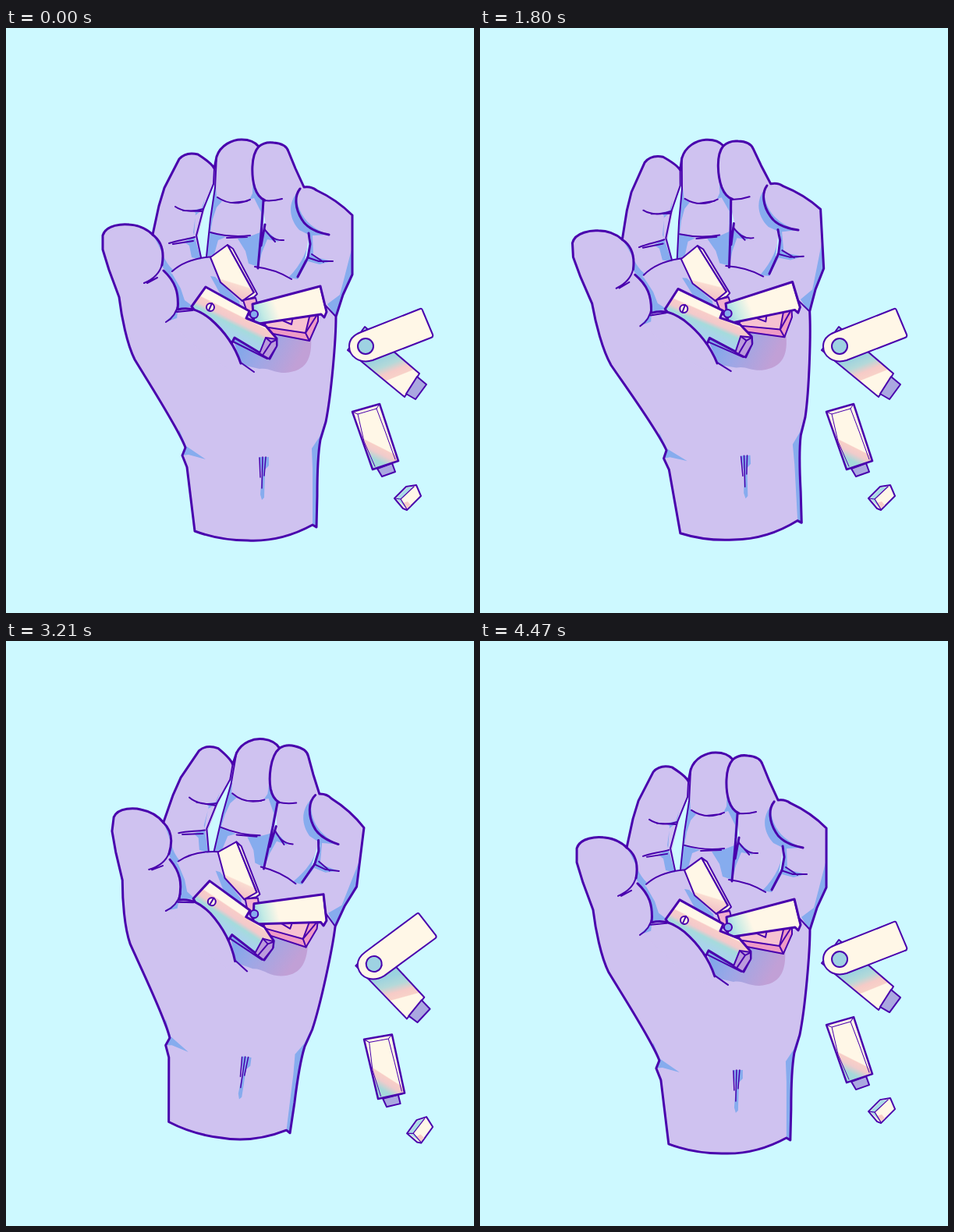
Write an HTML page that moves like this. It is 600 by 750 pixels and loops after 4500 ms.

```html
<!DOCTYPE html>
<html lang="en">
<head>
<meta charset="utf-8">
<title>Hand and drives</title>
<style>
  html, body { margin: 0; height: 100%; overflow: hidden; background: #cdf9ff; }
  svg { display: block; width: 100vw; height: 100vh; }
  path, circle, use { stroke-linejoin: round; stroke-linecap: round; }
  .ink { stroke: #4900ad; stroke-width: 2; }
  .bold { stroke: #4900ad; stroke-width: 3; }
  .line { fill: none; }
  .skin { fill: #cfc2f0; }
  .shade { fill: #86acee; }
  .sky { fill: #cdf9ff; }
  .cream { fill: #fff7e7; }
  .plug { fill: #aaa8e0; }
</style>
</head>
<body>
<svg viewBox="0 0 600 750">
  <defs>
    <linearGradient id="palm" gradientUnits="userSpaceOnUse" x1="305" y1="395" x2="372" y2="432">
      <stop stop-color="#80a8ea"/><stop offset=".4" stop-color="#9da7e6"/><stop offset="1" stop-color="#c1a0d6"/>
    </linearGradient>
    <linearGradient id="stripe" gradientUnits="userSpaceOnUse" x1="292" y1="349" x2="275" y2="383">
      <stop offset=".36" stop-color="#fff7e7"/><stop offset=".4" stop-color="#f8cdc8"/>
      <stop offset=".6" stop-color="#f3c9cb"/><stop offset=".76" stop-color="#a5dbdc"/><stop offset="1" stop-color="#a9d4ea"/>
    </linearGradient>
    <linearGradient id="upright" gradientUnits="userSpaceOnUse" x1="296" y1="319" x2="288" y2="345">
      <stop offset=".3" stop-color="#fff7e7"/><stop offset=".36" stop-color="#fadbd0"/><stop offset="1" stop-color="#f1bfc8"/>
    </linearGradient>
    <linearGradient id="side" gradientUnits="userSpaceOnUse" x1="314" y1="370" x2="347" y2="358">
      <stop stop-color="#92cfe4"/><stop offset=".45" stop-color="#c4ebe5"/><stop offset="1" stop-color="#fff7e7"/>
    </linearGradient>
    <linearGradient id="swivel" gradientUnits="userSpaceOnUse" x1="476" y1="420" x2="491" y2="457">
      <stop offset=".1" stop-color="#9bd3df"/><stop offset=".4" stop-color="#b4d9d9"/>
      <stop offset=".65" stop-color="#f6cbc7"/><stop offset=".84" stop-color="#f8d1c8"/><stop offset=".87" stop-color="#fff7e7"/>
    </linearGradient>
    <linearGradient id="stick" gradientUnits="userSpaceOnUse" x1="483" y1="530" x2="469" y2="558">
      <stop offset=".24" stop-color="#fff7e7"/><stop offset=".28" stop-color="#f8cfc7"/>
      <stop offset=".5" stop-color="#f0cbcb"/><stop offset=".8" stop-color="#a5d9da"/>
    </linearGradient>
    <path id="silhouette" d="M124 284V266C128 252 150 251 158 252C172 253 181 258 188 265L196 228L203 205L222 168C229 160 238 160 246 162C257 169 264 174 267 180L270 165C275 150 290 143 302 143C312 143 320 147 324 152C330 147 336 146 343 147C355 148 360 152 362 158L371 180L382 204C388 203 393 204 398 208Q424 220 444 240V316L432 342L423 370C423 400 417 470 410 505L403 528C400 545 399 565 399 600L398 640L393 637C360 655 330 658 310 657C280 657 258 651 242 645L232 563L226 548L230 538C222 515 180 450 165 425C155 405 148 370 145 345L132 310Z"/>
    <clipPath id="inside"><use href="#silhouette"/></clipPath>
  </defs>

  <g id="hand">
    <use href="#silhouette" class="skin"/>

    <g class="shade" clip-path="url(#inside)">
      <path d="M186 262L192 272C200 286 203 300 214 310L209 318L199 304C202 287 197 273 186 262Z"/>
      <path d="M255 218L252 233L243 240L240 262L243 272L250 297L238 294L235 279L228 274L241 268L243 237L238 234L251 231Z"/>
      <path d="M269 200L270 217L277 222L270 230L265 245L262 262L282 268L272 272L267 290L256 294L264 235Z"/>
      <path d="M313 267L326 262L323 306L311 302L307 286L297 270Z"/>
      <path d="M317 168C313 190 319 207 330 221L332 258L350 274L335 271L328 288L323 308L327 236L318 218L312 220L316 212Z"/>
      <path d="M373 211C361 226 363 245 376 259L388 265C389 280 381 301 362 320L374 322L387 299L402 303L418 299L394 293L393 266L413 265C390 256 372 240 373 211Z"/>
      <path d="M444 280V316L423 372L412 354L428 342L434 319Z"/>
      <path d="M203 311C216 324 221 338 221 360L240 357L229 349L224 334L213 315Z"/>
      <path d="M204 377L220 362L242 366L228 369Z"/>
      <path d="M222 515L231 536L256 553L234 547L226 548L231 562L220 550Z"/>
      <path d="M413 492L402 524L392 539L393 565L393 640H403L402 540Z"/>
      <path d="M425 392L419 425L414 480L421 420Z"/>
      <path d="M324 550H337L337 561L332 566L331 602L328 605L326 598L328 572Z"/>
    </g>

    <path class="sky" d="M267 181L266 200L255 231L246 268L251 295L257 293L263 240L268 205Z"/>
    <path class="sky" d="M330 235L333 252L326 276L324 300L327 260Z"/>
    <path class="sky" d="M389 263L391 270L389 289L383 299Z"/>

    <use href="#silhouette" class="bold line"/>
    <path class="ink line" d="M267 180L266 200L253 232L244 266L250 294M270 164L268 205L262 245L257 293"/>
    <path class="bold line" d="M324 152C313 164 315 192 319 205C322 214 327 219 332 221M330 221L328 252L323 308M332 252L327 279"/>
    <path class="bold line" d="M377 206C369 216 371 232 379 245C385 256 398 262 414 265M388 263L390 277L387 294L374 319"/>
    <path class="ink line" d="M217 229C227 236 241 236 253 232M227 234L251 235M209 276C220 272 232 271 242 268M214 277L240 273"/>
    <path class="ink line" d="M271 217C284 226 299 226 313 220M290 224L309 222M262 262C280 267 297 268 313 266M283 269L309 268"/>
    <path class="ink line" d="M330 221C339 222 347 221 354 219M331 257C337 267 345 273 356 272M333 260L345 274M386 294L401 299L419 299M392 290L407 300M374 319L386 296"/>
    <path class="ink line" d="M213 312C225 301 244 294 268 293M319 306C336 308 350 312 366 322M408 354L422 369"/>
    <path class="ink line" style="stroke-width:1.5" d="M325 551L326 576M329 550L328 590M333 550L331 574"/>

    <path fill="url(#palm)" d="M290 397L330 380L391 395C393 424 385 440 358 442C343 442 337 435 325 437L303 432Z"/>
    <path class="shade" d="M262 318L268 319L299 350L301 361L278 347Z"/>

    <path class="ink" fill="url(#upright)" d="M262 294L284 278L318 340L303 350L275 326Z"/>
    <path class="ink cream" d="M284 278L291 283L322 341L318 345L303 350L318 339Z"/>
    <path class="ink" fill="#f1afcf" d="M304 349L320 346L325 364L318 375L309 364Z"/>
    <path class="ink" fill="#ee9bc5" d="M329 379L400 365V376L389 401L337 391Z"/>
    <path class="ink" fill="#f7c2d1" d="M334 377L390 366L384 391L330 383Z"/>
    <path class="ink line" d="M350 373L366 380L368 370M384 391L389 401M384 391L398 369"/>
    <path class="bold" fill="url(#side)" d="M316 354L403 331L411 364L408 371L404 367L318 380Z"/>
    <path class="line ink" d="M403 332L407 349L411 364"/>
    <circle class="ink shade" cx="318" cy="367" r="5"/>

    <path class="bold" fill="url(#stripe)" d="M256 332L312 363L308 372L318 376L333 382L347 398V407L338 424L293 397L289 405L262 390L238 357Z"/>
    <path class="ink" fill="#bb9bdc" d="M333 397L347 399V408L337 424L325 417Z"/>
    <path class="ink line" d="M333 397L340 403L346 400M340 403L330 418M291 402L335 424"/>
    <circle class="ink cream" cx="262" cy="358" r="5"/>
    <path class="ink line" d="M264 353L260 362"/>

    <path class="skin" d="M220 363C235 357 247 363 261 373C284 393 296 412 302 431L290 440L255 420L218 385Z"/>
    <path class="bold line" d="M188 265C200 274 203 288 200 304M202 311C217 325 222 339 220 361C236 357 248 362 262 373C285 393 295 412 301 430"/>
    <path class="ink line" d="M200 303C197 315 189 322 177 327M181 327L194 320M221 353C219 364 214 372 205 377M219 364L239 362M301 429L318 441"/>
  </g>

  <g id="swivelDrive">
    <g id="body">
      <path class="ink" fill="url(#swivel)" d="M460 383L530 443L511 473L438 413Z"/>
      <path class="ink plug" d="M527 447L539 457L525 476L513 469Z"/>
    </g>
    <g id="cover">
      <path class="ink cream" d="M531 360Q533 359 534 362L547 393Q548 396 545 397L470 426C453 431 440 421 440 408C440 399 447 393 455 390Z"/>
      <circle class="ink" fill="#9ed2e2" cx="461" cy="408" r="10"/>
    </g>
  </g>

  <g id="stickDrive">
    <path class="ink plug" d="M476 565L495 558L499 569L482 575Z"/>
    <path class="ink" style="stroke-width:2.5" fill="url(#stick)" d="M444 492L479 482L503 555L470 566Z"/>
    <path class="ink line" style="stroke-width:1" d="M444 492L451 495L475 488L479 482M451 495L459 530L473 562M475 488L486 517L499 553"/>
  </g>

  <g id="cap">
    <path class="ink cream" d="M498 603L513 588L526 586L532 600L514 618L509 616Z"/>
    <path fill="#a9dbe6" d="M500 603L514 589L522 588L506 604L512 615Z"/>
    <path fill="#f8cdc8" d="M509 609L515 607L519 612L514 616Z"/>
    <path class="ink line" style="stroke-width:1.2" d="M498 603L506 604L523 588M506 604L514 617"/>
  </g>
</svg>
<script>
const LOOP = 4500, STEP = 30;

// time, turn in degrees, vertical shift
const handKeys = [
  [0, 0, 0], [990, 8.6, -27.3], [1800, -3.1, 1.5],
  [2700, 0, 0], [3600, 11.7, -37.5], [4500, 0, 0]
];

const $ = id => document.getElementById(id);
const ease = p => (1 - Math.cos(Math.PI * p)) / 2;

function pose(id, cx, cy, angle, dx = 0, dy = 0) {
  $(id).setAttribute('transform', `translate(${dx} ${dy}) rotate(${angle} ${cx} ${cy})`);
}

function handAt(t) {
  const next = handKeys.findIndex(key => key[0] > t);
  const a = handKeys[next - 1], b = handKeys[next];
  const p = ease((t - a[0]) / (b[0] - a[0]));
  return [1, 2].map(i => a[i] + (b[i] - a[i]) * p);
}

// one dip per toss, resting between 1800 and 2700 ms
function dipAt(t) {
  if (t >= 2700) t -= 2700;
  return t < 1800 ? ease(t / 900) : 0;
}

function draw(now) {
  const t = Math.floor(now % LOOP / STEP) * STEP;
  const [turn, shift] = handAt(t), dip = dipAt(t);
  pose('hand', 272.5, 372, turn, 0, shift);
  pose('swivelDrive', 0, 0, 0, 17.8 * dip, 10 * dip);
  pose('cover', 461, 408, -25 * dip);
  pose('body', 461, 408, 11 * dip);
  pose('stickDrive', 474, 524, 10 * dip, 19 * dip, 36 * dip);
  pose('cap', 515, 602, -15 * dip, 26 * dip, 42.5 * dip);
  requestAnimationFrame(draw);
}
requestAnimationFrame(draw);
</script>
</body>
</html>
```
